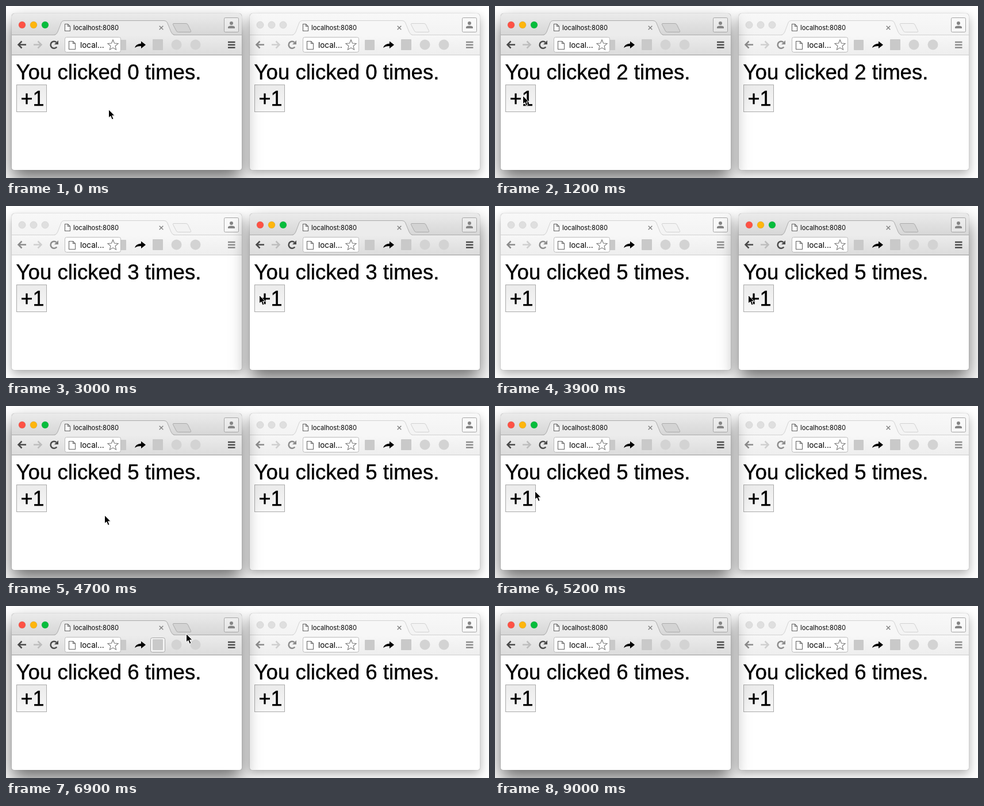
These frames come from a looping animation (840 px wide and 300 px high, 9.1 s). An HTML page:

```html
<!DOCTYPE html>
<html lang="en">
<head>
<meta charset="utf-8">
<title>Synced click counter</title>
<style>
html, body { margin: 0; width: 840px; height: 300px; overflow: hidden; background: #fff; }
#stage { position: relative; width: 840px; height: 300px; overflow: hidden; }
svg { display: block; }

.window {
  --ink: #8c8c8c; --soft: #cfcfcf; --line: #cdcdcd; --edge: #d2d2d2; --tab: #f7f7f7; --plus: #f3f3f3;
  position: absolute; top: 13px; width: 400px; height: 273px; z-index: 1;
  border-radius: 5px 5px 4px 4px;
  background:
    linear-gradient(#f8f8f8, #f3f3f3) 0 0 / 100% 38px no-repeat,
    linear-gradient(#f7f7f7, #eeeeee) 0 38px / 100% 34px no-repeat, #fff;
  box-shadow: 0 0 1px rgba(0, 0, 0, .5), 0 7px 18px rgba(0, 0, 0, .32);
}
.window.active {
  --ink: #4a4a4a; --soft: #bdbdbd; --line: #969696; --edge: #ababab; --tab: #ececec; --plus: #d3d3d3;
  z-index: 2;
  background:
    linear-gradient(#ebebeb, #d6d6d6) 0 0 / 100% 38px no-repeat,
    linear-gradient(#ececec, #dcdcdc) 0 38px / 100% 34px no-repeat, #fff;
  box-shadow: 0 0 1px rgba(0, 0, 0, .6), 0 16px 32px rgba(0, 0, 0, .57);
}
#left { left: 10px; }
#right { left: 424px; }

.light { fill: #dfdfdf; stroke: #d2d2d2; stroke-width: .8; }
.active .light { fill: var(--c); stroke: rgba(0, 0, 0, .12); }
.line { fill: none; stroke: var(--line); }
.tab { fill: var(--tab); stroke: var(--edge); }
.plus { fill: var(--plus); stroke: var(--edge); }
.ink { fill: none; stroke: var(--ink); stroke-width: 2.5; }
.soft { fill: none; stroke: var(--soft); stroke-width: 2.5; }
.solid { fill: var(--ink); }
.user { fill: rgba(255, 255, 255, .3); stroke: #a5a5a5; }
.field { fill: #fff; stroke: #b9b9b9; }
.page { fill: #fff; stroke: #666; stroke-width: 1.1; }
.star { fill: #fff; stroke: #777; stroke-width: 1.1; }
.addon { fill: #c9c9c9; }
.pale { fill: #d3d3d3; }
.hover { fill: #f4f4f4; stroke: #a8a8a8; visibility: hidden; }
.ui { font-family: Inter, "Open Sans", sans-serif; fill: #000; }
.big { font-family: "Liberation Sans", Arial, sans-serif; fill: #000; stroke: #000; stroke-width: .45; }
.button { fill: url(#up); stroke: #a9a9a9; }
.pressed .button { fill: url(#down); }
#cursor { position: absolute; left: 0; top: 0; z-index: 3; overflow: visible; }
</style>
</head>
<body>
<div id="stage">
  <div class="window" id="left"></div>
  <div class="window" id="right"></div>
  <svg id="cursor" width="12" height="19">
    <defs>
      <linearGradient id="up" x2="0" y2="1"><stop stop-color="#ebebeb"/><stop offset="1" stop-color="#f7f7f7"/></linearGradient>
      <linearGradient id="down" x2="0" y2="1"><stop stop-color="#d8d8d8"/><stop offset="1" stop-color="#ebebeb"/></linearGradient>
    </defs>
    <path d="M-.5 -.5V14L2.900 11L5.300 17L8 15.900L5.600 10.200H10Z" fill="#000" stroke="#fff" stroke-width="1"/>
  </svg>
</div>
<script>
const LOOP = 9100, STEP = 100;
const $ = id => document.getElementById(id);

const lights = ['#ff5245', '#ffb60d', '#06bd3c']
  .map((c, i) => `<circle class="light" style="--c:${c}" cx="${28 + 20 * i}" cy="33" r="6"/>`).join('');

const page = (x, y, w, h) =>
  `<path class="page" d="M${x} ${y}h${w - 4}l4 4v${h - 4}h${-w}zM${x + w - 4} ${y}v4h4"/>`;

function star(cx, cy, r) {
  const points = Array.from({ length: 10 }, (_, i) => {
    const a = i * Math.PI / 5, d = i % 2 ? r * .45 : r;
    return `${(cx + d * Math.sin(a)).toFixed(2)},${(cy - d * Math.cos(a)).toFixed(2)}`;
  });
  return `<polygon class="star" points="${points.join(' ')}"/>`;
}

// Both windows share the left window's coordinates; only the add-ons shift.
const chrome = shift => `<svg width="400" height="273" viewBox="10 13 400 273">
  <path class="line" style="stroke:var(--edge)" d="M10 50.5H410"/>
  <path class="tab" d="M84 50.5Q88 50 90 45L96 29Q97.5 25.5 101 25.5H275Q279 25.5 280.5 29L287 45Q289 50 293 50.5"/>
  <path d="M86 51H291" stroke="var(--tab)" stroke-width="2"/>
  <path class="plus" d="M292 30.5H313Q315.5 30.5 316.5 33L321.5 43.5Q322.5 45.5 320 45.5H299.5Q297 45.5 296 43L290.5 32.5Q289.5 30.5 292 30.5Z"/>
  ${lights}
  ${page(102.5, 31.5, 9, 12)}
  <text class="ui" x="117" y="42" font-size="11.2">localhost:8080</text>
  <path d="M266.7 34.7l6.6 6.6m0-6.6l-6.6 6.6" stroke="#808080" stroke-width="1.4"/>
  <rect class="user" x="379.5" y="20.5" width="25" height="25" rx="2"/>
  <circle cx="392" cy="30" r="3" fill="#858585"/>
  <path d="M386 39V37Q386 34.5 392 34.5T398 37V39Z" fill="#858585"/>
  <path class="ink" d="M35 67.5H22M27.5 61.5L21.5 67.5L27.5 73.5"/>
  <path class="soft" d="M48 67.5H61M55.5 61.5L61.5 67.5L55.5 73.5"/>
  <path class="ink" d="M88.3 71.5A6 6 0 1 1 87.5 63.2"/>
  <path class="solid" d="M91 60V67H84Z"/>
  <g transform="translate(${shift} 0)">
    <rect class="addon" x="192" y="59" width="17" height="18" rx="1"/>
    <path d="M224 73Q225.5 66 235 65.5V61.5L243 67.8L235 74V70Q228 69.5 224 73Z" fill="#000"/>
    <rect class="hover" x="251.5" y="55.5" width="25" height="25" rx="3"/>
    <rect class="addon" x="255" y="58" width="18" height="19" rx="1"/>
    <circle class="pale" cx="296.5" cy="67.5" r="9"/>
    <circle class="pale" cx="329.5" cy="67.5" r="9"/>
  </g>
  <rect class="field" x="102.5" y="54.5" width="97" height="26" rx="3"/>
  ${page(109.5, 61.5, 11, 14)}
  <text class="ui" x="129" y="73" font-size="13.5">local...</text>
  ${star(186, 68.5, 9.5)}
  <path class="ink" d="M386 63H398.5M386 67.8H398.5M386 72.6H398.5"/>
  <path class="line" d="M10 85.5H410"/>
  <text class="big" x="17.5" y="128" font-size="36.6">You clicked <tspan class="count">0</tspan> times.</text>
  <rect class="button" x="18.5" y="137.5" width="52" height="47"/>
  <text class="big" x="46" y="174" font-size="36" text-anchor="middle">+1</text>
</svg>`;

const left = $('left'), right = $('right'), cursor = $('cursor');
left.innerHTML = chrome(0);
right.innerHTML = chrome(18);
const counts = document.querySelectorAll('.count');
const hover = left.querySelector('.hover');

// Pointer stops: time, x, y
const stops = [
  [0, 179, 181], [200, 179, 181], [700, 49, 157], [1500, 49, 157],
  [1900, 464, 190], [2000, 462, 191], [2500, 441, 156], [4200, 441, 156],
  [4700, 172, 191], [5000, 150, 197], [5200, 70, 149], [5300, 49, 156],
  [6400, 49, 156], [6800, 264, 67], [6900, 314, 49], [7000, 345, 38]
];
const clicks = [800, 1100, 1400, 3300, 3600, 5600];
const within = (t, from, to) => t >= from && t < to;

function pointer(t) {
  const i = stops.findIndex(s => s[0] > t);
  if (i < 0) return stops[stops.length - 1].slice(1);
  const [t0, x0, y0] = stops[i - 1], [t1, x1, y1] = stops[i];
  const p = (t - t0) / (t1 - t0), e = p * p * (3 - 2 * p);
  return [x0 + (x1 - x0) * e, y0 + (y1 - y0) * e];
}

function draw(t) {
  const rightActive = within(t, 1900, 4700);
  const pressed = clicks.some(c => within(t, c - 100, c));
  const total = clicks.filter(c => t >= c).length;
  left.classList.toggle('active', !rightActive);
  right.classList.toggle('active', rightActive);
  left.classList.toggle('pressed', pressed && !rightActive);
  right.classList.toggle('pressed', pressed && rightActive);
  counts.forEach(el => { el.textContent = total; });
  hover.style.visibility = within(t, 6800, 7000) ? 'visible' : 'hidden';
  const [x, y] = pointer(t);
  cursor.style.transform = `translate(${Math.round(x)}px, ${Math.round(y)}px)`;
  cursor.style.opacity = t < 7100 ? 1 : 0;
}

const start = performance.now();
function tick() {
  const t = (performance.now() - start) % LOOP;
  draw(Math.floor(t / STEP) * STEP);
  requestAnimationFrame(tick);
}
tick();
</script>
</body>
</html>
```
